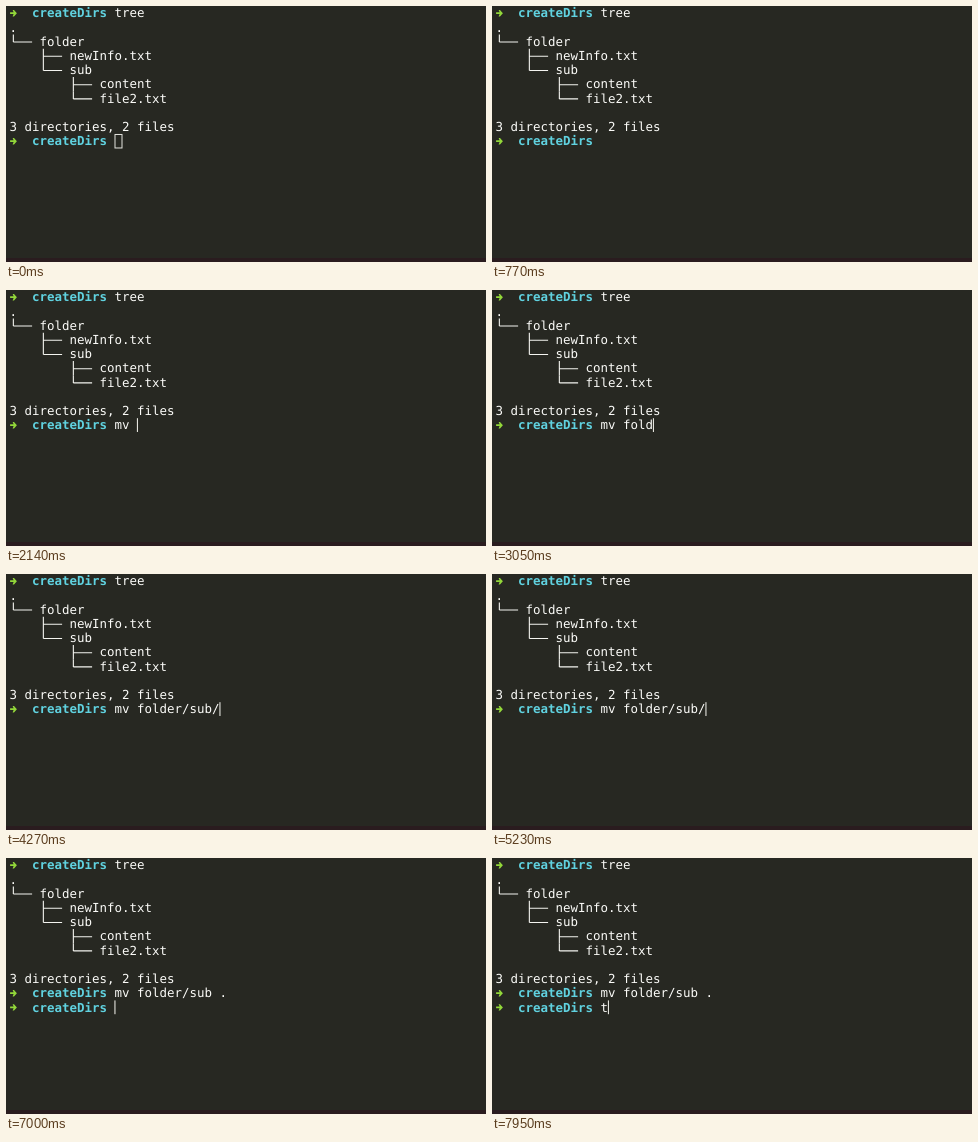
Write an HTML page that moves like this. It is 480 by 256 pixels and loops after 8 s.

```html
<!DOCTYPE html>
<html lang="en">
<head>
<meta charset="utf-8">
<title>Terminal</title>
<style>
  html, body { margin: 0; width: 100%; height: 100%; overflow: hidden; background: #272822; }
  svg { display: block; width: 100%; height: 100%; }
  text {
    font: 12.46px "DejaVu Sans Mono", "Liberation Mono", monospace;
    fill: #fbfbf8; white-space: pre; text-rendering: geometricPrecision;
  }
  .dir { font-weight: bold; fill: #60d2e0; }
  .arrow { fill: #93d83a; }
  .tree { fill: none; stroke: #f4f4f0; stroke-width: 1.1; }
  .box { fill: none; stroke: #e4e4de; stroke-width: 1; }
  .bar { fill: #e4e4de; }
</style>
</head>
<body>
<svg viewBox="0 0 480 256">
  <rect width="480" height="256" fill="#272822"/>
  <rect y="252" width="480" height="4" fill="#2a1c1f"/>
</svg>
<script>
const LOOP = 8000, CELL = 7.5, LINE = 14.22, LEFT = 3.6, BASE = 11.3;
const svg = document.querySelector('svg');
const colX = col => LEFT + col * CELL;
const rowY = row => row * LINE;

function add(parent, tag, attrs, content = '') {
  const node = document.createElementNS('http://www.w3.org/2000/svg', tag);
  for (const key in attrs) node.setAttribute(key, attrs[key]);
  node.textContent = content;
  return parent.appendChild(node);
}

const write = (parent, row, col, content, cls = '') =>
  add(parent, 'text', { x: colX(col), y: rowY(row) + BASE, class: cls }, content);

// Draws a prompt and returns the text node that holds its command.
function prompt(row, command = '') {
  const group = add(svg, 'g', {});
  add(group, 'path', {
    class: 'arrow',
    transform: `translate(${LEFT} ${rowY(row) + 7.2})`,
    d: 'M.5-.9H4L3-3.2H4.4L7.3 0 4.4 3.2H3L4 .9H.5Z'
  });
  write(group, row, 3, 'createDirs', 'dir');
  return { group, command: write(group, row, 14, command) };
}

function branch(row, col, name, last) {
  const x = colX(col) + CELL / 2, top = rowY(row), mid = top + 7.6;
  add(svg, 'path', {
    class: 'tree',
    d: `M${x} ${top}V${last ? mid : top + LINE}M${x} ${mid}H${colX(col + 3)}`
  });
  write(svg, row, col + 4, name);
}

prompt(0, 'tree');
write(svg, 1, 0, '.');
branch(2, 0, 'folder', true);
branch(3, 4, 'newInfo.txt', false);
branch(4, 4, 'sub', true);
branch(5, 8, 'content', false);
branch(6, 8, 'file2.txt', true);
write(svg, 8, 0, '3 directories, 2 files');

const first = prompt(9), second = prompt(10);
const box = add(svg, 'rect', { class: 'box', x: colX(14) + .4, y: rowY(9) + .5, width: 7, height: 13.5 });
const bar = add(svg, 'rect', { class: 'bar', width: 1.1, height: 13.8 });

const FOCUS = 400, ENTER = 6400;
const typed = [
  [0, ''], [1450, 'm'], [1720, 'mv'], [1900, 'mv '],
  [2350, 'mv f'], [2560, 'mv fo'], [2720, 'mv fol'], [2890, 'mv fold'],
  [3160, 'mv folder/'], [3500, 'mv folder/s'], [3800, 'mv folder/sub/'],
  [5400, 'mv folder/sub '], [5960, 'mv folder/sub .']
];
const typedNext = [[0, ''], [7750, 't']];
const valueAt = (steps, t) => steps.filter(step => step[0] <= t).pop()[1];
const show = (node, on) => node.setAttribute('visibility', on ? 'visible' : 'hidden');

function draw() {
  const t = performance.now() % LOOP;
  const entered = t >= ENTER;
  const line = valueAt(typed, t), next = valueAt(typedNext, t);
  first.command.textContent = line;
  second.command.textContent = next;
  show(second.group, entered);
  show(box, t < FOCUS);
  show(bar, t >= FOCUS && (t + 100) % 1000 < 500);
  bar.setAttribute('x', colX(14 + (entered ? next : line).length) - .2);
  bar.setAttribute('y', rowY(entered ? 10 : 9) + .2);
  requestAnimationFrame(draw);
}
draw();
</script>
</body>
</html>
```
